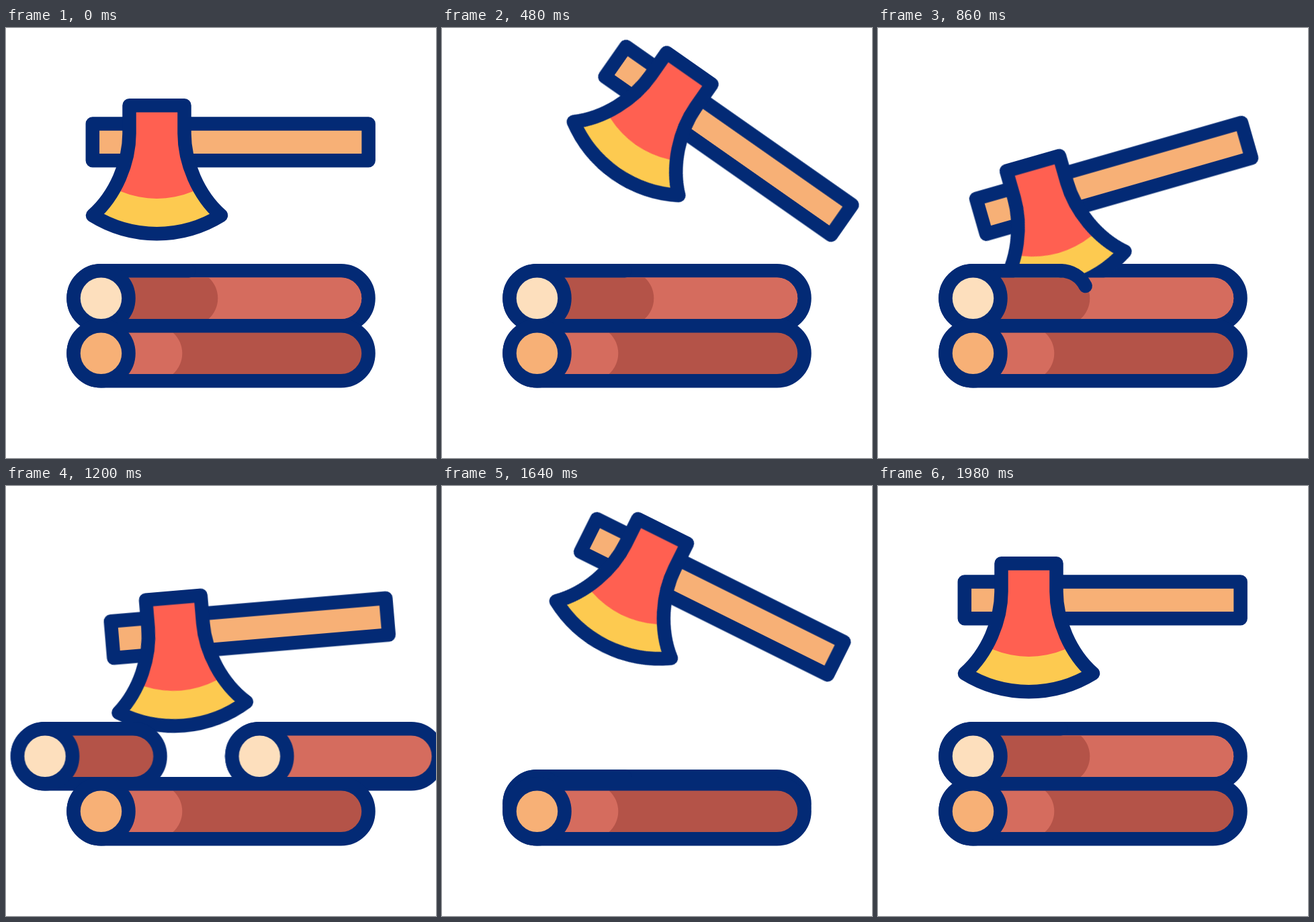
Recreate the animation shown at these times as an HTML page. Size 640 by 640 pixels, loop 2400 ms.

```html
<!DOCTYPE html>
<html lang="en">
<head>
<meta charset="utf-8">
<title>Axe and logs</title>
<style>
  html, body { margin: 0; width: 100%; height: 100%; overflow: hidden; background: #fff; }
  svg { display: block; width: 100%; height: 100%; }

  .line { stroke: #032a75; stroke-width: 20.5; stroke-linejoin: round; stroke-linecap: round; }
  .none { fill: none; }
  .dark { fill: #b45348; }
  .light { fill: #d56c5e; }
  .cream { fill: #fddfbd; }
  .wood { fill: #f7b076; }
  .red { fill: #ff6051; }
  .gold { fill: #fdca50; }

  .lift, .swing, .rise, .crack, .left, .right {
    animation: 2400ms cubic-bezier(.333, 0, .667, 1) infinite;
  }
  .lift { animation-name: lift; transform-origin: 416px 245.5px; }
  .swing { animation-name: swing; transform-origin: 487.8px 205.5px; }
  .rise { animation-name: rise; }
  .crack { animation-name: crack; stroke-dasharray: 100 200; }
  .left { animation-name: left; }
  .right { animation-name: right; }
  .whole { animation: whole 2400ms step-end infinite; }
  .halves { animation: halves 2400ms step-end infinite; }

  /* axe raised from its resting place and put back */
  @keyframes lift {
    0%, 82.5%, 100% { transform: translate(0px, 0px) rotate(0deg); }
    20%, 61.667% { transform: translate(34.1px, 31.3px) rotate(35deg); }
  }
  /* the chop itself */
  @keyframes swing {
    0%, 20%, 61.667%, 100% { transform: translate(0px, 0px) rotate(0deg); }
    32.5%, 45% { transform: translate(-69px, -5.7px) rotate(-51deg); }
  }
  @keyframes crack {
    0%, 32% { stroke-dashoffset: 100; }
    41.667%, 45% { stroke-dashoffset: 0; }
    45.01%, 100% { stroke-dashoffset: 100; }
  }
  @keyframes left {
    0%, 41.667% { transform: translateX(0px); }
    66.667%, 100% { transform: translateX(-319px); }
  }
  @keyframes right {
    0%, 41.667% { transform: translateX(0px); }
    66.667%, 100% { transform: translateX(399px); }
  }
  /* a new log comes up from behind the lower one */
  @keyframes rise {
    0%, 64.1% { transform: translateY(0px); }
    64.167% { transform: translateY(82px); }
    82.5%, 100% { transform: translateY(0px); }
  }
  @keyframes whole {
    0% { opacity: 1; }
    41.667% { opacity: 0; }
    64.167%, 100% { opacity: 1; }
  }
  @keyframes halves {
    0% { opacity: 0; }
    41.667% { opacity: 1; }
    66.667%, 100% { opacity: 0; }
  }
</style>
</head>
<body>
<svg viewBox="0 0 640 640">
  <defs>
    <path id="head" d="M183.5 115.3V157C183.5 200 163 249 129 279A181.5 181.5 0 0 0 320 279C286 249 265.5 200 265.5 157V115.3Z"/>
    <clipPath id="blade"><use href="#head"/></clipPath>
    <rect id="log" x="100.5" y="361.2" width="439" height="82" rx="41"/>
    <circle id="end" cx="141.5" cy="402.2" r="41"/>
  </defs>

  <g class="whole"><g class="rise">
    <use href="#log" class="line light"/>
  </g></g>

  <g class="swing"><g class="lift">
    <rect class="line wood" x="128.8" y="142.4" width="410.8" height="54.8"/>
    <use href="#head" class="gold"/>
    <circle class="red" cx="224.5" cy="116" r="138" clip-path="url(#blade)"/>
    <use href="#head" class="line none"/>
  </g></g>

  <!-- front of the upper log, which hides the sunken blade -->
  <g class="whole"><g class="rise">
    <rect class="light" x="150" y="371.4" width="379.3" height="61.6" rx="30.8"/>
    <path class="dark" d="M150 371.4H301.6A41.5 41.5 0 0 1 301.6 433H150Z"/>
    <path class="line none" d="M141.5 361.2H272"/>
    <path class="line none crack" pathLength="100" d="M272 361.2A41 41 0 0 1 272 443.2"/>
    <use href="#end" class="line cream"/>
  </g></g>

  <g class="halves">
    <g class="right">
      <rect class="line light" x="232" y="361.2" width="307.5" height="82" rx="41"/>
      <use href="#end" class="line cream" x="131.5"/>
    </g>
    <g class="left">
      <rect class="line dark" x="100.5" y="361.2" width="212.5" height="82" rx="41"/>
      <use href="#end" class="line cream"/>
    </g>
  </g>

  <g transform="translate(0 82)">
    <use href="#log" class="dark"/>
    <path class="light" d="M150 371.4H248.6A41.5 41.5 0 0 1 248.6 433H150Z"/>
    <use href="#log" class="line none"/>
    <use href="#end" class="line wood"/>
  </g>
</svg>
</body>
</html>
```
